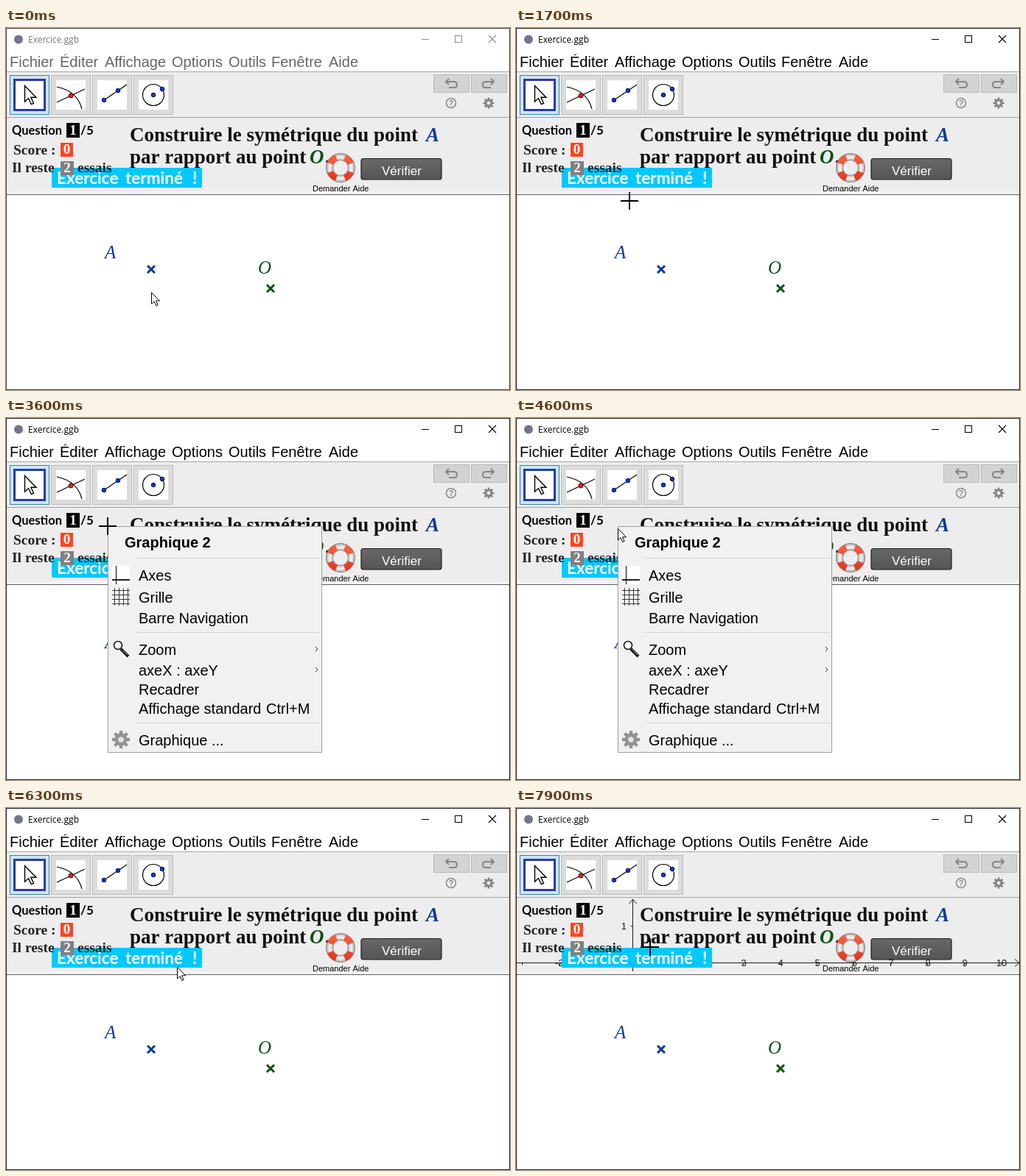
An HTML page with a canvas for the animation above (8000 ms loop, 684 by 492 pixels).

```html
<!DOCTYPE html>
<html lang="fr">
<head>
<meta charset="utf-8">
<title>Exercice</title>
<style>
html, body { margin: 0; width: 100%; height: 100%; overflow: hidden; background: #fff; }
canvas { display: block; }
</style>
</head>
<body>
<canvas id="stage" width="684" height="492"></canvas>
<script>
const ctx = document.getElementById('stage').getContext('2d');
const LOOP = 8000, STEP = 100;
const SANS = '"Liberation Sans", Arial, sans-serif';
const SERIF = '"Liberation Serif", serif';
const LATO = 'Lato, sans-serif';
const BLUE = '#0a3a9c', GREEN = '#0c5216';

// Times in ms at which the interface changes
const ACTIVE = 100, MENU_OPEN = 3600, MENU_CLOSE = 6300, AXES_ON = 6400;

// Pointer path: time, x, y
const PATH = [
  [0, 197, 359], [1100, 197, 359], [1700, 154, 235], [2000, 142, 172], [2400, 138, 148],
  [2700, 138, 148], [2800, 138, 147], [4500, 138, 147], [4600, 138, 150], [5300, 217, 214],
  [5400, 218, 215], [5600, 232, 216], [7000, 232, 216], [7100, 221, 200], [7300, 221, 200],
  [7900, 182, 189]
];

function pointerAt(t) {
  const i = PATH.findIndex(p => p[0] >= t);
  if (i <= 0) return { x: PATH[0][1], y: PATH[0][2] };
  const [t0, x0, y0] = PATH[i - 1], [t1, x1, y1] = PATH[i];
  const k = (t - t0) / (t1 - t0);
  return { x: Math.round(x0 + (x1 - x0) * k), y: Math.round(y0 + (y1 - y0) * k) };
}

function box(x, y, w, h, fill, stroke, lw = 1) {
  if (fill) { ctx.fillStyle = fill; ctx.fillRect(x, y, w, h); }
  if (stroke) {
    ctx.strokeStyle = stroke;
    ctx.lineWidth = lw;
    ctx.strokeRect(x + lw / 2, y + lw / 2, w - lw, h - lw);
  }
}

function text(s, x, y, font, color = '#000', align = 'left') {
  ctx.font = font;
  ctx.fillStyle = color;
  ctx.textAlign = align;
  ctx.fillText(s, x, y);
}

function line(points, color, lw = 1) {
  ctx.beginPath();
  points.forEach(([x, y]) => ctx.lineTo(x, y));
  ctx.strokeStyle = color;
  ctx.lineWidth = lw;
  ctx.stroke();
}

function disc(x, y, r, fill, stroke, lw = 1) {
  ctx.beginPath();
  ctx.arc(x, y, r, 0, 7);
  if (fill) { ctx.fillStyle = fill; ctx.fill(); }
  if (stroke) { ctx.strokeStyle = stroke; ctx.lineWidth = lw; ctx.stroke(); }
}

function cross(x, y, r, color, lw) {
  line([[x - r, y - r], [x + r, y + r]], color, lw);
  line([[x - r, y + r], [x + r, y - r]], color, lw);
}

function gear(x, y, r, color, hole) {
  for (let i = 0; i < 8; i++) {
    const a = i * Math.PI / 4, c = Math.cos(a), s = Math.sin(a);
    line([[x, y], [x + c * r, y + s * r]], color, r * 0.36);
  }
  disc(x, y, r * 0.72, color);
  disc(x, y, r * 0.32, hole);
}

function arrow(x, y, scale = 1) {
  ctx.save();
  ctx.translate(x + 0.5, y + 0.5);
  ctx.scale(scale, scale);
  ctx.beginPath();
  [[0, 0], [0, 15.5], [3.6, 12.2], [6.3, 18], [8.6, 17], [6, 11.3], [11, 11.3]]
    .forEach(p => ctx.lineTo(...p));
  ctx.closePath();
  ctx.fillStyle = '#fff';
  ctx.fill();
  ctx.strokeStyle = '#000';
  ctx.lineWidth = 1;
  ctx.stroke();
  ctx.restore();
}

function titleBar(active) {
  const ink = active ? '#000' : '#8c8c8c';
  disc(17, 15.5, 6, '#74748f');
  text('Exercice.ggb', 30, 20, '12px "Open Sans", sans-serif', active ? '#000' : '#777');
  box(564, 15, 10, 1, ink);
  box(609, 10, 10, 10, null, ink);
  cross(660, 15, 5, ink, 1.1);
  const items = [['Fichier', 5], ['Éditer', 73], ['Affichage', 134], ['Options', 225],
    ['Outils', 302], ['Fenêtre', 360], ['Aide', 438]];
  for (const [s, x] of items) text(s, x, 53, '20px ' + SANS, active ? '#000' : '#666');
}

function toolbar() {
  box(0, 59, 684, 168, '#ededed');
  box(0, 59, 684, 1, '#a6a6a6');
  box(0, 121, 684, 1, '#a0a0a0');

  box(5, 64, 54, 54, '#cbe6fa', '#3d7fb0');
  box(10, 69, 44, 44, '#fff', '#2a3aa4', 3);
  arrow(25, 78, 1.4);
  for (const x of [61, 117, 173]) {
    box(x, 64, 54, 54, '#dcdcdc', '#bcbcbc');
    box(x + 7, 71, 40, 40, '#fff');
  }

  line([[69, 101], [107, 83]], '#000', 1.2);
  ctx.beginPath();
  ctx.moveTo(69, 80);
  ctx.quadraticCurveTo(97, 86, 103, 110);
  ctx.stroke();
  disc(88, 92, 3, '#f01818', '#500');

  line([[133, 98], [164, 77]], '#000', 1.2);
  disc(200, 91, 14.5, null, '#000', 1.2);
  for (const [x, y] of [[133, 98], [152, 85], [200, 91], [212, 83]])
    disc(x, y, 2.8, '#1538c8', '#00103c');

  for (const x of [580, 631]) box(x, 63, 49, 25, '#d3d3d3', '#b9b9b9');
  for (const [x, d] of [[604, 1], [655, -1]]) {
    ctx.beginPath();
    ctx.moveTo(x - 7 * d, 73);
    ctx.lineTo(x + 4 * d, 73);
    ctx.quadraticCurveTo(x + 8 * d, 73, x + 8 * d, 77);
    ctx.quadraticCurveTo(x + 8 * d, 81, x + 4 * d, 81);
    ctx.lineTo(x - 3 * d, 81);
    ctx.strokeStyle = '#858585';
    ctx.lineWidth = 2;
    ctx.stroke();
    line([[x - 3 * d, 69], [x - 7 * d, 73], [x - 3 * d, 77]], '#858585', 2);
  }
  disc(604, 102, 6.5, null, '#8a8a8a', 1.5);
  text('?', 604, 106, 'bold 11px ' + SANS, '#858585', 'center');
  gear(655, 102, 7.5, '#858585', '#ededed');
}

function axes() {
  const ink = '#1c1c1c', ox = 158.5, oy = 210.5, unit = 50;
  line([[1, oy], [683, oy]], ink);
  line([[677, oy - 5], [683, oy], [677, oy + 5]], ink);
  line([[ox, 222], [ox, 124]], ink);
  line([[ox - 5, 130], [ox, 124], [ox + 5, 130]], ink);
  line([[ox - 3, oy - unit], [ox, oy - unit]], ink);
  text('1', 150, 165, '13px ' + SANS, ink, 'right');
  for (let n = -3; n <= 10; n++) {
    const x = ox + n * unit;
    line([[x, oy], [x, oy + 3]], ink);
    if (n > -3 && n !== 0) text(n, x + 0.5, 215, '13px ' + SANS, ink, 'center');
  }
}

function badge(s, x, y, w, h, fill) {
  box(x, y, w, h, fill);
  text(s, x + w / 2, y + h - 4, 'bold 19px ' + SERIF, '#fff', 'center');
}

function lifebuoy(x, y) {
  const ring = (from, to, color) => {
    ctx.beginPath();
    ctx.arc(x, y, 15, from, to);
    ctx.strokeStyle = color;
    ctx.lineWidth = 9;
    ctx.stroke();
  };
  const shade = ctx.createRadialGradient(x, y, 10, x, y, 20);
  shade.addColorStop(0, '#b4b4b4');
  shade.addColorStop(0.45, '#f6f6f6');
  shade.addColorStop(1, '#a2a2a2');
  ring(0, 7, shade);
  const red = ctx.createLinearGradient(x, y - 20, x, y + 20);
  red.addColorStop(0, '#ff6444');
  red.addColorStop(1, '#e2321c');
  for (let i = 0; i < 4; i++) {
    const a = Math.PI / 4 + i * Math.PI / 2;
    ring(a - 0.4, a + 0.4, red);
  }
  disc(x, y, 19.5, null, '#8e8078');
  disc(x, y, 10.5, null, '#94867e');
}

function exercise(showAxes) {
  if (showAxes) axes();
  box(0, 222, 684, 4, '#f3f3f3');
  box(0, 226, 684, 1, '#5c5c5c');

  box(62, 190, 204, 27, '#00c8ff');
  for (const [s, x] of [['Exercice', 69], ['terminé', 162], ['!', 253]])
    text(s, x, 212, 'bold 22.5px ' + LATO, '#fff');

  const small = 'bold 19.5px ' + SERIF;
  text('Question', 8, 145, 'bold 16.5px ' + LATO);
  badge('1', 82, 129, 18, 20, '#000');
  text('/5', 101, 145, 'bold 17px ' + LATO);
  text('Score :', 10, 172, small, '#222');
  badge('0', 74, 156, 17, 19, '#ff4422');
  text('Il reste', 8, 196, small, '#222');
  badge('2', 74, 181, 18, 19, '#808080');
  text('essais', 97, 196, small, '#222');

  const large = 'bold 27px ' + SERIF;
  text('Construire le symétrique du point', 168, 154, large, '#111');
  text('A', 570, 154, 'italic ' + large, BLUE);
  text('par rapport au point', 168, 184, large, '#111');
  text('O', 412, 184, 'italic ' + large, GREEN);
  text('.', 433, 184, large, '#111');

  lifebuoy(454, 190);
  text('Demander Aide', 416, 222, '11px ' + SANS);

  const face = ctx.createLinearGradient(0, 177, 0, 206);
  face.addColorStop(0, '#686868');
  face.addColorStop(1, '#555');
  ctx.beginPath();
  ctx.roundRect(482, 177.5, 109, 28.5, 3);
  ctx.fillStyle = face;
  ctx.fill();
  ctx.strokeStyle = '#1e1e1e';
  ctx.lineWidth = 1.2;
  ctx.stroke();
  text('Vérifier', 510, 200, '17px ' + SANS, '#fff');

  text('A', 134, 313, 'italic 25px ' + SERIF, BLUE);
  cross(197, 328, 5, BLUE, 3);
  text('O', 342, 334, 'italic 25px ' + SERIF, GREEN);
  cross(359, 354, 5, GREEN, 3);
}

function contextMenu(highlight) {
  box(138, 147, 291, 308, '#f1f1f1', '#a0a0a0');
  if (highlight) box(141, 198, 285, 30, '#91c9f7');
  text('Graphique 2', 161, 176, 'bold 20px ' + SANS);
  for (const y of [190, 291, 414]) box(177, y, 249, 1, '#d2d2d2');

  const items = [['Axes', 221], ['Grille', 251], ['Barre Navigation', 279], ['Zoom', 322],
    ['axeX : axeY', 350], ['Recadrer', 376], ['Affichage standard', 402], ['Graphique ...', 445]];
  for (const [s, y] of items) text(s, 180, y, '20px ' + SANS);
  text('Ctrl+M', 353, 402, '20px ' + SANS);
  for (const y of [314, 342]) line([[420, y - 3], [423, y], [420, y + 3]], '#333');

  box(144, 201, 24, 25, '#fff');
  box(149, 201, 1, 25, '#000');
  box(144, 219, 24, 2, '#222');

  box(144, 231, 24, 24, '#fff');
  for (let i = 0; i < 4; i++) {
    box(147 + i * 6, 231, 1, 24, '#333');
    box(144, 234 + i * 6, 24, 1, '#333');
  }

  disc(152, 309, 5.5, '#fff', '#111', 1.5);
  line([[156, 314], [166, 324]], '#111', 4);
  line([[158, 315], [165, 322]], '#aaa', 1);
  gear(156, 437, 12, '#929292', '#e2e2e2');
}

function pointer(t, { x, y }) {
  const isCross = (t >= 600 && t < 4500) || t >= 7100;
  if (!isCross) return arrow(x, y);
  box(x - 12, y - 1, 24, 2, '#000');
  box(x - 1, y - 12, 2, 24, '#000');
}

function draw(t) {
  const active = t >= ACTIVE, pos = pointerAt(t);
  box(0, 0, 684, 492, '#fff');
  titleBar(active);
  toolbar();
  exercise(t >= AXES_ON);
  if (t >= MENU_OPEN && t < MENU_CLOSE) contextMenu(pos.y >= 198 && pos.y < 228);
  box(0, 0, 684, 492, null, active ? '#222' : '#444');
  pointer(t, pos);
}

const start = performance.now();
function tick() {
  const t = (performance.now() - start) % LOOP;
  draw(Math.floor(t / STEP) * STEP);
  requestAnimationFrame(tick);
}
tick();
</script>
</body>
</html>
```
